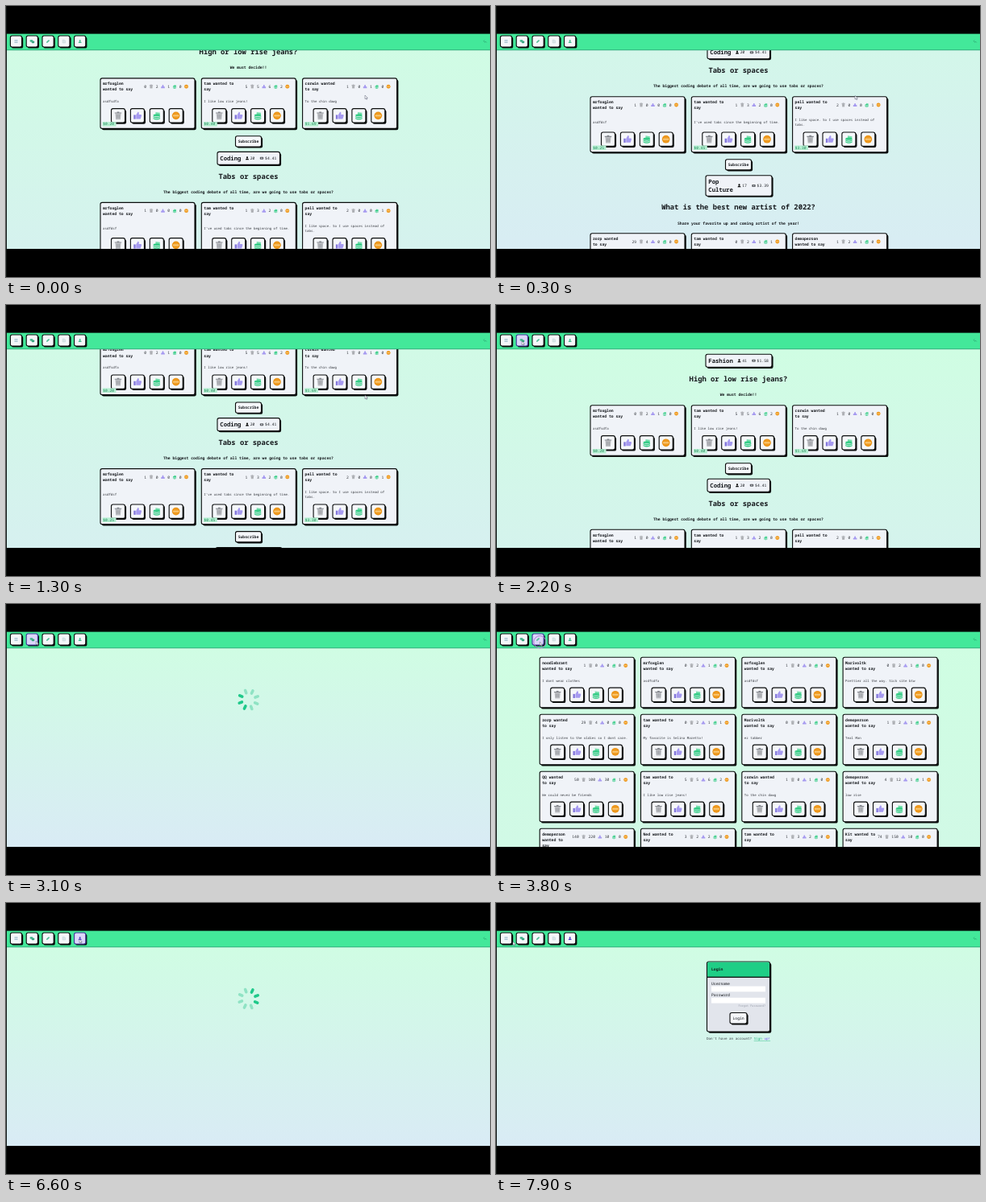
An HTML page for the animation above (8 s loop, 600x337 px).

```html
<!DOCTYPE html>
<html lang="en">
<head>
<meta charset="utf-8">
<title>Debate site tour</title>
<style>
html, body { margin: 0; height: 100%; overflow: hidden; background: #000; }
svg { display: block; width: 100vw; height: 100vh; }
text { font-family: "Noto Sans Mono", "DejaVu Sans Mono", monospace; text-rendering: geometricPrecision; white-space: pre; }
.b { font-weight: 700; }
.m { text-anchor: middle; }
.u { text-decoration: underline; }
</style>
</head>
<body>
<svg id="stage" viewBox="0 0 600 337"></svg>
<script>
const LOOP = 8000;
const stage = document.getElementById('stage');

const rect = (x, y, w, h, fill, more = '') =>
  `<rect x="${x}" y="${y}" width="${w}" height="${h}" fill="${fill}" ${more}/>`;
const text = (x, y, str, size = 4.75, cls = '', fill = '#15181c') =>
  `<text x="${x}" y="${y}" font-size="${size}" class="${cls}" fill="${fill}">${str}</text>`;
const icon = (id, x, y, scale = 1) =>
  `<use href="#${id}" transform="translate(${x} ${y}) scale(${scale})"/>`;
// Outlined box with a hard shadow
const box = (x, y, w, h, fill = '#f5f7fa', drop = 1.6) =>
  rect(x + drop, y + drop, w, h, '#0a0c0c', 'rx="2.2"') +
  rect(x, y, w, h, fill, 'rx="2.2" stroke="#0a0c0c" stroke-width="1.1"');

const defs = `<defs>
  <linearGradient id="sky" x2="0" y2="1"><stop stop-color="#cffee2"/><stop offset="1" stop-color="#d9ebf5"/></linearGradient>
  <linearGradient id="mint" x2="0" y2="1"><stop stop-color="#cffee2"/><stop offset="1" stop-color="#d1f9e6"/></linearGradient>
  <g id="trash"><path d="M-4-3.2h8l-.8 8.4h-6.4z" fill="#bcbec2"/><path d="M-4.6-3.6h9.2M-1.5-4.8h3" stroke="#85888e" stroke-width="1.1"/><path d="M-1.7-1.5v5M0-1.5v5M1.7-1.5v5" stroke="#92959b" stroke-width=".7"/></g>
  <g id="thumb" fill="#a69af0"><path d="M-1.8-.8L.6-5q2.2 0 1.3 3.6h3q1 .6.6 1.8l-1.3 4H-1.8z"/><rect x="-5" y="-1" width="2.6" height="5.6" fill="#8377dc"/></g>
  <path id="up" d="M-1.2-4.6h2.4l1.2 4.2 2.6 1.4v3.4H-5V1l2.6-1.4z" fill="#a69af0"/>
  <g id="cash" fill="#35cc86"><path d="M-1.5-4.8l6 1-.6 4-5.4-1z" fill="#79dfae"/><ellipse cy="-.6" rx="4.6" ry="1.7"/><path d="M-4.6.6q4.6 2.6 9.2 0v1.4q-4.6 2.8-9.2 0zM-4.6 2.8q4.6 2.6 9.2 0v1.4q-4.6 2.8-9.2 0z"/></g>
  <g id="badge"><circle r="5.3" fill="#f19d22"/><circle r="4.3" fill="none" stroke="#d9820f" stroke-width=".5"/><rect x="-4" y="-1" width="8" height="2" fill="#f8c878"/></g>
  <g id="user"><circle cy="-1.1" r="1.2"/><path d="M-2.3 2.1q.3-2 2.3-2t2.3 2z"/></g>
  <g id="note"><rect x="-2.2" y="-1.5" width="4.4" height="3" rx=".8" fill="#5a5d62"/><circle r=".8" fill="#d0d3d8"/></g>
</defs>`;

const kinds = ['trash', 'thumb', 'cash', 'badge'];
const countKinds = ['trash', 'up', 'cash', 'badge'];

// Counts run from the right edge towards the left
function stats(x, y, counts) {
  let out = '', at = x + 106.5;
  for (let i = 3; i >= 0; i--) {
    const extra = (String(counts[i]).length - 1) * 2.85;
    out += icon(countKinds[i], at, y, .46) +
      text(at - 7.25 - extra / 2, y + 1.7, counts[i], 4.75, 'm', '#33363c');
    at -= 14.5 + extra;
  }
  return out;
}

function card(x, y, [who, counts, body, price], grow = 0) {
  const lines = body.split('|');
  const first = y + 30.3 + grow / 2 - (lines.length - 1) * 3;
  let out = box(x, y, 117, 62.5 + grow, '#f0f3f8', 1.8);
  who.split('|').forEach((s, i) => out += text(x + 3, y + 8.2 + i * 7.4, s, 4.75, 'b'));
  out += stats(x, y + 10.3, counts);
  lines.forEach((s, i) => out += text(x + 3, first + i * 6, s, 4.11, '', '#3a3d43'));
  kinds.forEach((k, i) => {
    const bx = x + 13.5 + i * 23.9, by = y + 37.8 + grow;
    out += box(bx, by, 17, 17.4) + icon(k, bx + 8.5, by + 8.7, .92);
  });
  if (price) out += rect(x + 2.5, y + 54.3 + grow, 17, 5.5, '#b5efd1') +
    text(x + 3.2, y + 58.6 + grow, price, 4.6, '', '#23875c');
  return out;
}

function pill(x, y, w, h, lines, users, money) {
  const r = x + w, mid = y + h / 2;
  let out = box(x, y, w, h, '#f0f3f8');
  lines.forEach((s, i) => out += text(x + 3.3, mid + 2.6 + (i - (lines.length - 1) / 2) * 9.8, s, 7.25, 'b'));
  return out + icon('user', r - 40.5, mid, .9) + text(r - 36.8, mid + 1.7, users) +
    icon('note', r - 22.5, mid) + text(r - 18.4, mid + 1.7, money);
}

const head = (y, title, sub) =>
  text(300.5, y, title, 8.83, 'b m') + text(300.5, y + 18.5, sub, 4.75, 'b m');
const subscribe = y => box(284.5, y, 32, 13.2) + text(300.5, y + 8.4, 'Subscribe', 4.75, 'b m');
const row = (y, list, grow) => list.map((c, i) => card(117 + i * 125.3, y, c, grow)).join('');

const fox = 'mrfoxglen|wanted to say', tam = 'tam wanted to|say',
  corwin = 'corwin wanted|to say', zorp = 'zorp wanted|to say',
  demo = 'demoperson|wanted to say', mari = 'Marivoltk|wanted to say';
const jeans = 'I like low rise jeans!', chin = 'To the chin dawg',
  oldies = 'I only listen to the oldies so I dont care.',
  singer = 'My favorite is Selina Maretto!',
  tabs = "I've used tabs since the beginning of time.";

const home = rect(0, 35, 600, 470, 'url(#sky)') +
  pill(260, 61.3, 82, 16, ['Fashion'], 41, '$1.58') +
  head(94.6, 'High or low rise jeans?', 'We must decide!!') +
  row(124.8, [
    [fox, [0, 2, 1, 0], 'asdfsdfa', '$0.20'],
    [tam, [5, 5, 6, 2], jeans, '$0.40'],
    [corwin, [1, 0, 1, 0], chin, '$1.69']]) +
  subscribe(196.7) +
  pill(262, 216.3, 77.5, 16, ['Coding'], 20, '$4.41') +
  head(249.5, 'Tabs or spaces', 'The biggest coding debate of all time, are we going to use tabs or spaces?') +
  row(279.3, [
    [fox, [1, 0, 0, 0], 'asdfdsf', '$0.25'],
    [tam, [1, 3, 2, 0], tabs, '$0.45'],
    ['pell wanted to|say', [2, 0, 0, 1], 'I like space. So I use spaces instead of|tabs.', '$3.30']], 6.5) +
  subscribe(357.3) +
  pill(260, 377.3, 82, 25.5, ['Pop', 'Culture'], 17, '$3.39') +
  head(420, 'What is the best new artist of 2022?', 'Share your favorite up and coming artist of the year!') +
  row(449.3, [
    [zorp, [29, 4, 0, 0], oldies, '$0.30'],
    [tam, [0, 2, 1, 1], singer, '$0.42'],
    [demo, [1, 2, 1, 0], 'Teal Man', '$1.20']]);

const posts = [
  ['noodlebrant|wanted to say', [1, 0, 0, 0], 'I dont wear clothes'],
  [fox, [0, 2, 1, 0], 'asdfsdfa'],
  [fox, [1, 0, 0, 0], 'asdfdsf'],
  [mari, [0, 2, 1, 0], 'Prettier all the way. Sick site btw'],
  [zorp, [29, 4, 0, 0], oldies],
  [tam, [0, 2, 1, 1], singer],
  [mari, [0, 0, 1, 0], 'ez tabber'],
  [demo, [1, 2, 1, 0], 'Teal Man'],
  ['QQ wanted|to say', [50, 100, 30, 1], 'We could never be friends'],
  [tam, [5, 5, 6, 2], jeans],
  [corwin, [1, 0, 1, 0], chin],
  [demo, [4, 12, 1, 1], 'low rise'],
  ['demoperson|wanted to|say', [140, 220, 10, 0], ''],
  ['Ned wanted to|say', [3, 2, 2, 0], ''],
  [tam, [1, 3, 2, 0], ''],
  ['Kit wanted to|say', [74, 150, 10, 0], '']
].map((c, i) => card(54.2 + i % 4 * 125.3, 66.3 + (i >> 2) * 71, c)).join('');

let spokes = '';
for (let i = 0; i < 8; i++)
  spokes += rect(-1.8, -14, 3.6, 7, i === 0 || i > 5 ? '#1fc98a' : '#8fe3c4', `rx="1.8" transform="rotate(${i * 45})"`);

const login = box(261.5, 73, 78, 87, '#e2e5ec', 1.8) +
  '<path d="M262.1 92V75q0-1.4 1.4-1.4h74q1.4 0 1.4 1.4v17z" fill="#1fce86"/>' +
  rect(261.5, 91.6, 78, 1.3, '#0a0c0c') +
  text(267, 84.3, 'Login', 4.75, 'b') +
  text(267, 101.6, 'Username') + rect(267, 103.5, 67, 6.8, '#fff') +
  text(267, 115.8, 'Password') + rect(267, 117.8, 67, 6.8, '#fff') +
  text(300.5, 129, 'Forgot Password?', 3.5, '', '#9a9fab') +
  box(290, 136.5, 21, 13.5) + text(300.6, 145.1, 'Login', 4.75, 'm') +
  text(261, 170.4, "Don't have an account?", 4.25, '', '#3a3d43') +
  text(319.7, 170.4, 'Sign <tspan fill="#7a55f5">up!</tspan>', 4.25, 'u', '#20b57d');

const glyphs = [
  '<path d="M-2.3-1.6h4.6M-2.3 0h4.6M-2.3 1.6h4.6" stroke="#8fb3c4" stroke-width=".8"/>',
  '<rect x="-3" y="-2.3" width="4" height="3" rx="1"/><rect x="-.6" y="-.6" width="3.8" height="3" rx="1" fill="#3aa581"/>',
  '<path d="M-2.3 2.3l.5-1.9L1-2.3l1.3 1.3-2.7 2.8z"/>',
  '<path d="M-2-2.3h2.6L2-.9v3.2h-4z" fill="#dbe5e8" stroke="#b5cdd0" stroke-width=".4"/>',
  '<use href="#user"/>'
];
const navX = i => 5.4 + i * 19.8;
const buttons = glyphs.map((g, i) =>
  `<g class="nav">${box(navX(i), 37, 14.2, 14)}<g transform="translate(${navX(i) + 7.1} 44) scale(.9)" fill="#4fbd95">${g}</g></g>`).join('');

stage.innerHTML = defs +
  rect(0, 35, 600, 268, 'url(#sky)') +
  `<g id="home">${home}</g>` +
  `<g id="posts">${rect(0, 35, 600, 268, 'url(#mint)')}${posts}</g>` +
  `<g id="spinner">${spokes}</g>` +
  `<g id="login">${login}</g>` +
  rect(0, 34, 600, 21, '#43e89a') + rect(0, 54.3, 600, .9, '#35a97c') + buttons +
  '<path d="M593 42.5a1.3 1.3 0 1 0 1.8 1.8l1 1.2" fill="none" stroke="#2b9c6c" stroke-width=".7"/>' +
  rect(0, 0, 600, 34.6, '#000') + rect(0, 302, 600, 35, '#000') + rect(0, 0, 1, 337, '#101614') +
  '<circle id="ripple" fill="none" stroke="#b27ad6" stroke-width="1"/>' +
  '<path id="cursor" d="M0 0v4.6l1.1-1 .8 1.7.8-.4-.8-1.6h1.5z" fill="#fff" stroke="#555a70" stroke-width=".5"/>';

const $ = id => document.getElementById(id);
const navs = [...document.querySelectorAll('.nav')];
const show = (id, on) => $(id).style.display = on ? '' : 'none';

// Linear interpolation through [time, values...] keys
function track(keys, t) {
  const i = keys.findIndex(k => k[0] > t);
  if (i < 0) return keys[keys.length - 1].slice(1);
  const a = keys[i - 1], b = keys[i], p = (t - a[0]) / (b[0] - a[0]);
  return a.slice(1).map((v, n) => v + (b[n + 1] - v) * p);
}

const scroll = [[0, 34.5], [300, 166.5], [500, 188], [700, 178], [1000, 114.5], [1500, 50], [1900, 8], [2050, 0]];
const pointer = [[0, 445, 111], [1000, 445, 112.5], [1500, 445, 112], [2150, 32, 45], [3000, 33, 46],
  [3500, 54, 47], [4300, 55, 47.5], [4900, 73, 44], [6300, 74, 45], [6600, 91, 45], [7100, 91, 46], [7900, 21, 48]];

function draw(t) {
  const [x, y] = track(pointer, t);
  const page = t < 2800 ? 'home' : t < 3300 ? 'spinner' : t < 4000 ? 'posts' : t < 6900 ? 'spinner' : 'login';
  ['home', 'posts', 'spinner', 'login'].forEach(id => show(id, id === page));
  $('home').setAttribute('transform', `translate(0 ${-track(scroll, t)[0]})`);
  $('spinner').setAttribute('transform', `translate(300.7 119) rotate(${7 + (t - 5300) * .36})`);
  $('cursor').setAttribute('transform', `translate(${x} ${y})`);

  navs.forEach((nav, i) => {
    const left = navX(i);
    const over = y < 52 && x >= left && x <= left + 14.2;
    const face = nav.children[1];
    face.setAttribute('fill', over ? '#dcd7fa' : '#f5f7fa');
    face.setAttribute('stroke', over ? '#41349a' : '#0a0c0c');
    if (i === 4) nav.children[2].setAttribute('fill', t > 6600 ? '#5747c4' : '#4fbd95');
  });

  const click = (t - 3600) / 350;
  show('ripple', click > 0 && click < 1);
  $('ripple').setAttribute('cx', x);
  $('ripple').setAttribute('cy', y);
  $('ripple').setAttribute('r', Math.max(0, 3 + click * 8));
}

const start = performance.now();
function tick() {
  draw((performance.now() - start) % LOOP);
  requestAnimationFrame(tick);
}
tick();
</script>
</body>
</html>
```
